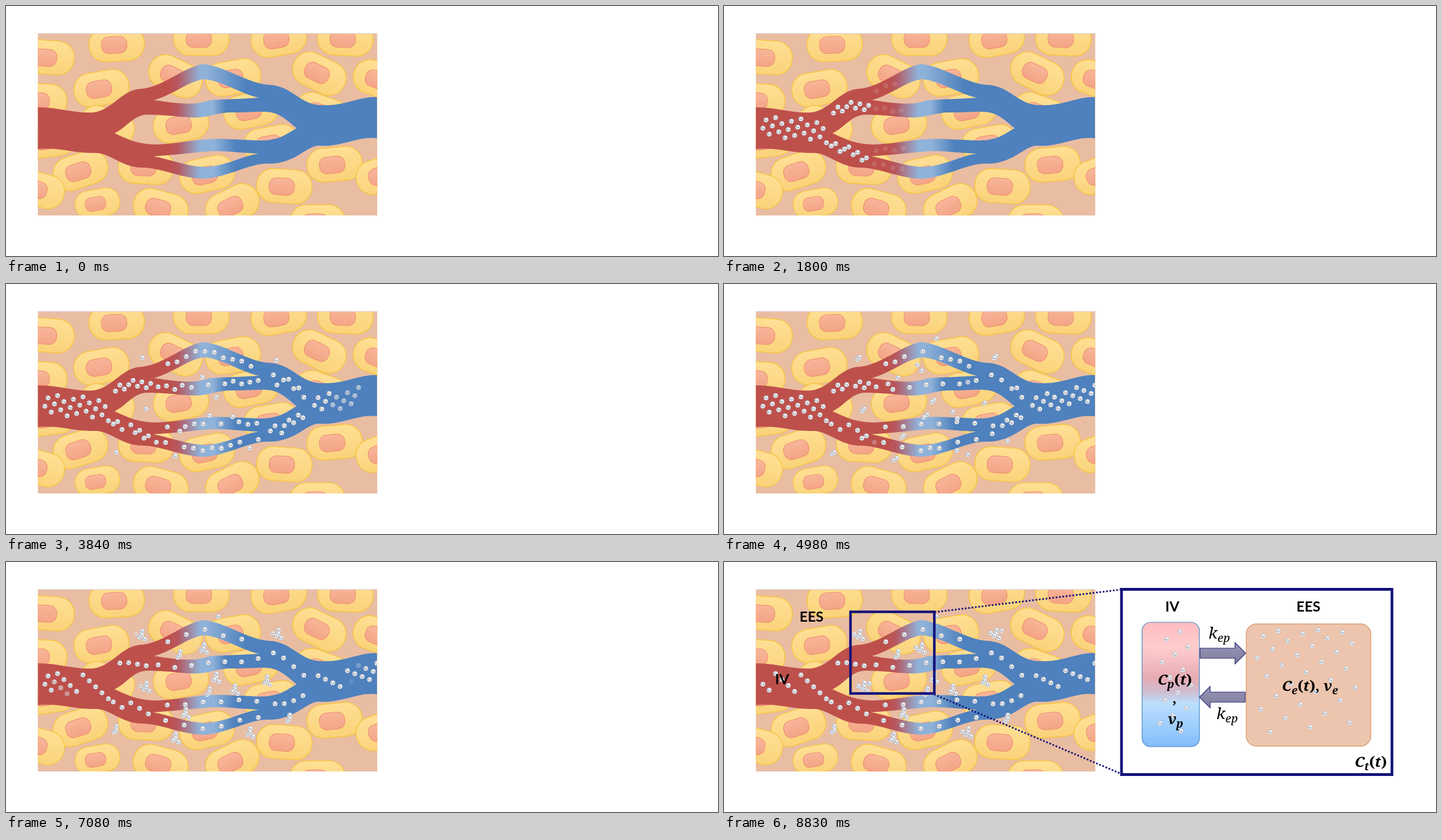
These frames come from a looping animation (1261x444 px, 8.89 s). An HTML page with a canvas:

```html
<!DOCTYPE html>
<html lang="en">
<head>
<meta charset="utf-8">
<title>Tracer exchange between vessel and tissue</title>
<style>
  html, body { margin: 0; width: 100%; height: 100%; overflow: hidden; background: #fff; }
  canvas { display: block; }
</style>
</head>
<body>
<canvas id="stage" width="1261" height="444"></canvas>
<script>
const W = 1261, H = 444, LOOP = 8890, STEP = 60, FADE = 480, DRIFT = 900;
const NAVY = '#12127a', GOLDEN = 0.618034;
const ctx = document.getElementById('stage').getContext('2d');

const ramp = (t, start, len) => Math.max(0, Math.min(1, (t - start) / len));
const mix = (a, b, k) => a + (b - a) * k;
const spread = i => (i * GOLDEN) % 1;
const range = (n, fn) => Array.from({ length: n }, (_, i) => fn(i));

function layer(draw) {
  const c = document.createElement('canvas');
  c.width = W;
  c.height = H;
  draw(c.getContext('2d'));
  return c;
}

function gradient(g, x0, y0, x1, y1, stops) {
  const fill = g.createLinearGradient(x0, y0, x1, y1);
  stops.forEach(([at, color]) => fill.addColorStop(at, color));
  return fill;
}

function box(g, x, y, w, h, r, fill, stroke, width) {
  g.beginPath();
  g.roundRect(x, y, w, h, r);
  if (fill) { g.fillStyle = fill; g.fill(); }
  if (stroke) { g.strokeStyle = stroke; g.lineWidth = width; g.stroke(); }
}

function clipRect(g, x, y, w, h) {
  g.beginPath();
  g.rect(x, y, w, h);
  g.clip();
}

// ---- Tissue and vessel ----

// Cell centre, tilt in degrees, optional size
const cells = [
  [72, 91, 4], [196, 68, -3], [346, 58, 0], [483, 58, -10], [601, 58, 3],
  [300, 125, 26], [402, 127, -10], [555, 120, 26], [663, 132, 20],
  [169, 146, -10], [59, 168, 3], [560, 190, 20], [310, 210, -10],
  [434, 185, -12], [470, 244, -10], [179, 213, 18], [75, 238, -8],
  [132, 292, -18], [55, 325, 15], [274, 359, 15], [248, 286, 3],
  [356, 299, -12], [401, 354, -26], [493, 320, 4], [582, 281, -5],
  [668, 298, -20], [552, 383, 0], [162, 350, -10, 0.81]
];

function drawCell(g, [x, y, tilt, size = 1]) {
  g.save();
  g.translate(x, y);
  g.rotate(tilt * Math.PI / 180);
  g.scale(size, size);
  box(g, -49, -30, 98, 60, 29,
    gradient(g, 0, -30, 0, 30, [[0, '#ffdf95'], [1, '#fad37a']]), '#f7c640', 1.6);
  box(g, -27, -14, 45, 30, 13,
    gradient(g, 0, -14, 0, 16, [[0, '#f8b699'], [1, '#f4a486']]), '#ef9170', 1.2);
  g.restore();
}

const vessel = new Path2D(
  'M56 180C92 179 118 191 155 189C190 184 205 148 240 147C280 143 315 108 350 103' +
  'C390 108 430 138 465 140C505 141 520 174 555 176C600 179 625 160 657 162V235' +
  'C625 230 595 251 555 248C532 247 512 282 462 280C430 280 390 305 350 307' +
  'C310 306 275 287 240 287C205 286 185 262 160 261C120 262 95 250 56 254Z' +
  'M262 167C295 158 325 133 350 130C385 133 415 156 448 163C415 165 385 166 362 167' +
  'C340 174 325 177 262 167Z' +
  'M192 226C215 215 225 194 250 193C285 193 320 199 340 198C365 196 375 189 400 189' +
  'C430 189 455 186 470 189C490 193 505 210 515 217C495 228 485 239 448 239' +
  'C425 238 395 236 370 236C335 237 300 245 265 246C230 245 215 236 192 226Z' +
  'M261 267C290 265 320 262 350 259C380 255 415 261 447 262C415 268 390 284 352 286' +
  'C320 285 290 272 261 267Z');

// Capillary zone: top, height, where the light part ends, where full blue starts
const zones = [[48, 117, 355, 425], [165, 52, 366, 390], [217, 47, 368, 408], [264, 108, 368, 405]];

function drawVessel(g) {
  const at = x => (x - 280) / 150;
  for (const [top, height, light, blue] of zones) {
    g.save();
    clipRect(g, 56, top, 602, height);
    g.fillStyle = gradient(g, 280, 0, 430, 0, [
      [at(288), '#be504b'], [at(304), '#b6575f'], [at(344), '#8fb2d9'],
      [at(light), '#8fb2d9'], [at(blue), '#4e81bd']
    ]);
    g.fill(vessel, 'evenodd');
    g.restore();
  }
}

const scene = layer(g => {
  g.fillStyle = '#fff';
  g.fillRect(0, 0, W, H);
  clipRect(g, 56.5, 48, 601, 324);
  g.fillStyle = '#e9bda2';
  g.fillRect(56, 48, 602, 324);
  cells.forEach(c => drawCell(g, c));
  drawVessel(g);
  g.fillStyle = '#e3d5d6';
  g.fillRect(56, 48, 602, 1.5);
});

// ---- Tracer particles ----

function dot(g, x, y, alpha = 1) {
  if (alpha <= 0) return;
  g.globalAlpha = alpha;
  g.beginPath();
  g.arc(x, y, 4.1, 0, 7);
  g.fillStyle = '#fbfcfd';
  g.fill();
  g.strokeStyle = '#a3a9b5';
  g.lineWidth = 0.7;
  g.stroke();
  g.beginPath();
  g.arc(x - 0.6, y - 0.3, 1.9, 2, 4.6);
  g.moveTo(x - 0.8, y + 1.6);
  g.lineTo(x + 1.6, y + 1.2);
  g.lineTo(x + 1.2, y - 0.9);
  g.strokeStyle = '#59647a';
  g.lineWidth = 0.9;
  g.stroke();
  g.globalAlpha = 1;
}

// Branches: particle count, half width, centre line
const branches = [
  [21, 20, [[66, 212], [184, 224]]],
  [9, 9, [[190, 190], [210, 180], [260, 175]]],
  [9, 9, [[186, 245], [217, 256], [256, 270]]],
  [11, 3, [[262, 154], [317, 130], [347, 117], [394, 131], [442, 147]]],
  [13, 4, [[262, 181], [328, 187], [364, 179], [405, 175], [454, 175]]],
  [12, 3, [[262, 257], [323, 253], [360, 245], [452, 248]]],
  [12, 3, [[258, 279], [301, 286], [340, 296], [381, 289], [455, 275]]],
  [8, 9, [[460, 163], [490, 170], [532, 196]]],
  [8, 9, [[464, 260], [500, 250], [530, 226]]],
  [18, 17, [[543, 212], [600, 205], [660, 192]]]
];

function centre(line, x) {
  const i = Math.max(1, line.findIndex(p => p[0] >= x));
  const [x0, y0] = line[i - 1], [x1, y1] = line[i];
  return mix(y0, y1, (x - x0) / (x1 - x0));
}

// The bolus fills the vessel band by band, faster once it reaches the capillaries
const entry = x => x < 266
  ? Math.floor((x - 56) / 70) * 580
  : 1740 + Math.floor((x - 266) / 52) * 300;

const particles = branches.flatMap(([n, half, line]) => range(n, i => {
  const x = mix(line[0][0], line[line.length - 1][0], (i + 0.5) / n);
  const y = centre(line, x) + half * (2 * spread(i + 1) - 1);
  return { x, y, born: entry(x) };
}));

// Places in the tissue where tracer gathers: centre and count
const clumps = [
  [482, 128, 7], [248, 222, 8], [195, 299, 3], [240, 130, 5], [360, 232, 3], [372, 206, 4],
  [300, 313, 4], [350, 154, 5], [405, 227, 4], [432, 303, 6], [318, 269, 4], [308, 166, 3],
  [502, 279, 3], [462, 211, 4], [376, 97, 1]
];

// Fill all clumps in turn, each as a small spiral
const spots = range(8, k => clumps
  .filter(c => k < c[2])
  .map(([x, y]) => {
    const r = 5 * Math.sqrt(k), a = k * 2.4;
    return [x + r * Math.cos(a), y + r * Math.sin(a)];
  })).flat();

// Every second particle leaves for a spot close to it
const free = particles.filter((_, i) => i % 2);
spots.slice(0, free.length).forEach(([x, y], i) => {
  const gap = p => Math.hypot(p.x - x, p.y - y);
  const p = free.reduce((a, b) => gap(b) < gap(a) ? b : a);
  free.splice(free.indexOf(p), 1);
  p.goal = { x, y, far: gap(p) > 45, start: Math.max(2750 + i * 75, p.born + FADE) };
});

function drawParticle(p, t) {
  const { x, y, born, goal } = p;
  const alpha = ramp(t, born, FADE);
  if (!goal) return dot(ctx, x, y, alpha);
  if (goal.far) {
    const k = ramp(t, goal.start, FADE);
    dot(ctx, x, y, alpha - k);
    dot(ctx, goal.x, goal.y, k);
  } else {
    const k = ramp(t, goal.start, DRIFT);
    dot(ctx, mix(x, goal.x, k), mix(y, goal.y, k), alpha);
  }
}

// ---- Compartment model ----

function label(g, text, x, y) {
  g.font = '700 25px Lato, sans-serif';
  g.fillText(text, x - g.measureText(text).width / 2, y);
}

// Letters are italic; a letter after "_" is a subscript
function formula(g, text, x, y, weight, size) {
  for (const [part] of text.matchAll(/_[a-z]+|[a-z]|[^a-z_]/gi)) {
    const sub = part[0] === '_', glyphs = part.replace('_', '');
    const style = /[a-z]/i.test(glyphs) ? 'italic' : 'normal';
    g.font = `${style} ${weight} ${size * (sub ? 0.74 : 1)}px "Noto Serif", serif`;
    g.fillText(glyphs, x, y + (sub ? 6 : 0));
    x += g.measureText(glyphs).width;
  }
}

function arrow(g, tip, y, dir) {
  const neck = tip - dir * 19, tail = tip - dir * 81;
  g.beginPath();
  [[tail, -9], [neck, -9], [neck, -19], [tip, 0], [neck, 19], [neck, 9], [tail, 9]]
    .forEach(([x, dy]) => g.lineTo(x, y + dy));
  g.closePath();
  g.fillStyle = gradient(g, 0, y - 18, 0, y + 18, [[0, '#9793b4'], [1, '#827e9f']]);
  g.fill();
  g.strokeStyle = '#2b2b78';
  g.lineWidth = 1.2;
  g.stroke();
}

// Evenly scattered dots; a bend above 1 crowds them towards the top
function scatter(g, n, x, y, w, h, bend) {
  range(n, i => dot(g, x + w * spread(i + 1), y + h * (i / (n - 1)) ** bend));
}

const model = layer(g => {
  box(g, 224, 88.5, 148.5, 145, 0, null, NAVY, 4.5);
  g.setLineDash([3, 3]);
  g.lineWidth = 3;
  g.beginPath();
  g.moveTo(373, 89);
  g.lineTo(703, 49);
  g.moveTo(372, 235);
  g.lineTo(703, 376);
  g.stroke();
  g.setLineDash([]);

  box(g, 704, 48.5, 479, 329, 0, '#fff', NAVY, 4.8);
  box(g, 740.5, 107, 101.5, 221, 15, gradient(g, 0, 107, 0, 328, [
    [0, '#ffbcbf'], [0.2, '#ffcdce'], [0.45, '#e6abb2'], [0.56, '#cfbdd0'],
    [0.65, '#bcdffd'], [1, '#82bdfc']
  ]), '#3f85c4', 1.2);
  box(g, 925, 110, 220.5, 217, 18, '#edc5ae', '#dd9c70', 1.5);
  scatter(g, 14, 770, 124, 60, 176, 1);
  scatter(g, 31, 938, 121, 184, 181, 1.4);
  arrow(g, 924, 162, 1);
  arrow(g, 842, 240, -1);

  g.fillStyle = '#000';
  label(g, 'EES', 155, 106);
  label(g, 'IV', 103, 217);
  label(g, 'IV', 794, 88);
  label(g, 'EES', 1035, 88);
  formula(g, 'k_ep', 858, 136, 400, 28);
  formula(g, 'k_ep', 872, 279, 400, 28);
  formula(g, 'C_p(t)', 768, 218, 700, 26);
  formula(g, ',', 794, 251, 700, 26);
  formula(g, 'v_p', 786, 288, 700, 26);
  formula(g, 'C_e(t), v_e', 988, 229, 700, 26);
  formula(g, 'C_t(t)', 1117, 364, 700, 26);
});

// ---- Playback ----

function draw(now) {
  const t = Math.floor((now % LOOP) / STEP) * STEP;
  ctx.drawImage(scene, 0, 0);
  ctx.save();
  clipRect(ctx, 56.5, 48, 601, 324);
  particles.forEach(p => drawParticle(p, t));
  ctx.restore();
  ctx.globalAlpha = ramp(t, 8320, FADE);
  ctx.drawImage(model, 0, 0);
  ctx.globalAlpha = 1;
}

const begin = performance.now();
function tick() {
  draw(performance.now() - begin);
  requestAnimationFrame(tick);
}
tick();
</script>
</body>
</html>
```
